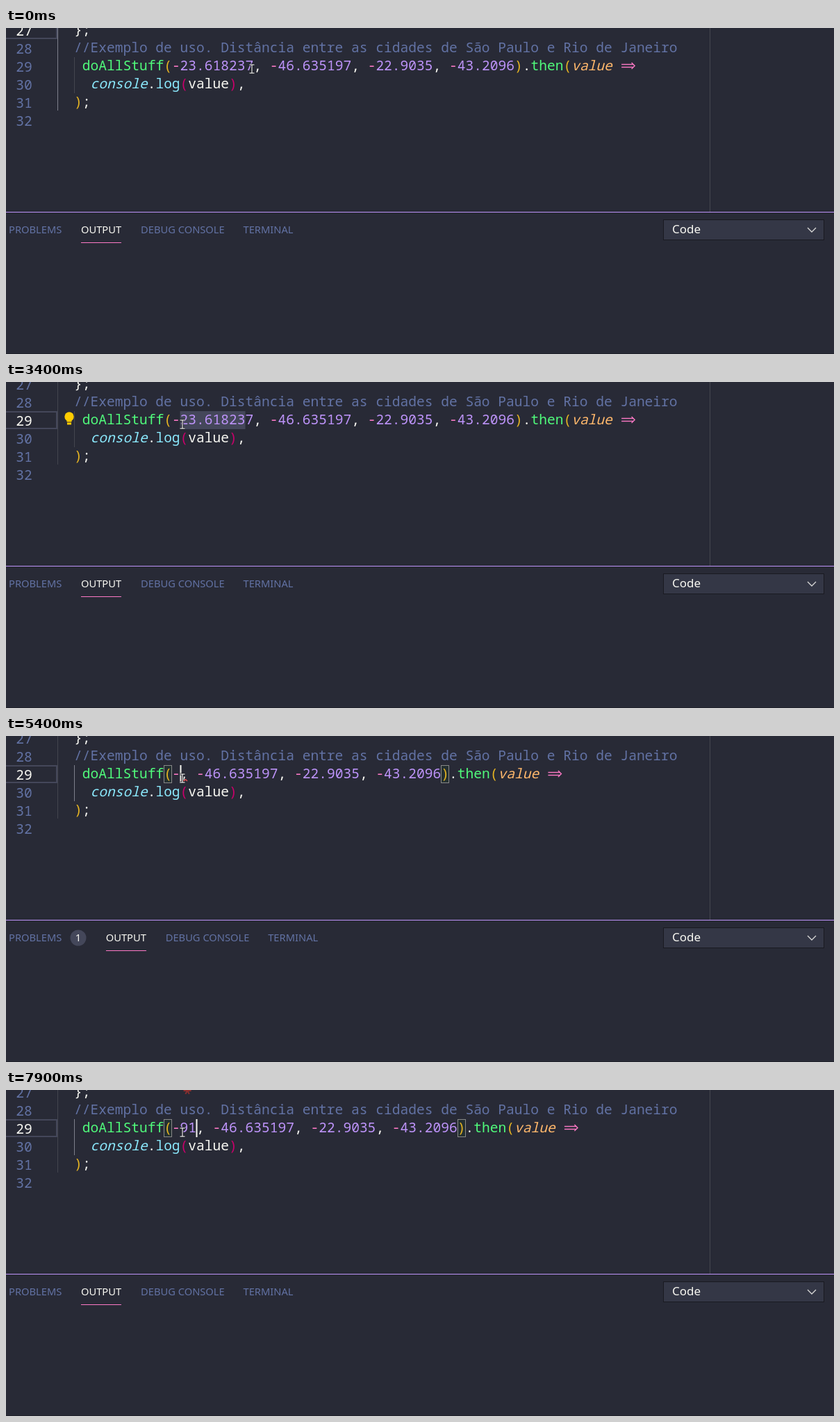
An HTML page with a canvas that plays this animation: 1192x470 px, repeating every 8 s.

```html
<!DOCTYPE html>
<html lang="pt">
<head>
<meta charset="utf-8">
<style>
  html, body { margin: 0; width: 100%; height: 100%; overflow: hidden; background: #282a36; }
  canvas { display: block; }
</style>
</head>
<body>
<canvas id="stage" width="1192" height="470"></canvas>
<script>
const ctx = document.getElementById('stage').getContext('2d');
const LOOP = 8000, STEP = 100;
const LEFT = 98, CHAR = 11.74, ROW = 26.1;
const CODE_FONT = '19.57px "Noto Sans Mono", monospace';
const C = {
  bg: '#282a36', text: '#f8f8f2', comment: '#6272a4', green: '#50fa7b', cyan: '#8be9fd',
  pink: '#ff79c6', purple: '#bd93f9', orange: '#ffb86c', gold: '#e6b422', magenta: '#c9006b',
  select: '#44475a', match: '#3f414d', guide: '#44464f', guideOn: '#7d7f8c'
};

// time, pointer x, pointer y, caret column
const POINTER = [
  [0, 354, 59, 21], [200, 357, 58, 21], [300, 360, 57, 21], [700, 356, 57, 21], [800, 352, 57, 21],
  [1100, 346, 57, 21], [1200, 338, 57, 21], [1300, 327, 57, 20], [1400, 320, 57, 19],
  [1500, 312, 57, 18], [1600, 305, 57, 18], [1700, 297, 57, 17], [1800, 287, 57, 16],
  [1900, 275, 57, 15], [2000, 267, 57, 15], [2300, 266, 57, 15], [2400, 263, 58, 14],
  [2700, 259, 59, 14], [3000, 254, 61, 13]
];
const CLICK = 1100, CUT = 3900, DELETE = 4400, TYPE_9 = 7300, TYPE_1 = 7500;
const KEYS = [CUT, DELETE, TYPE_9, TYPE_1];
const BLINKS = [CLICK, 2700, 3000, 3400, 3700, 4900, 5400, 5900, 6400, 6900, TYPE_9];
const ANCHOR = 21, FLAME_LIFE = 500;

const colX = col => LEFT + col * CHAR;
const rowY = line => Math.round(35 + (line - 28) * ROW);
const within = (t, from, to) => t >= from && t < to;

function rect(x, y, w, h, color) {
  ctx.fillStyle = color;
  ctx.fillRect(x, y, w, h);
}

function text(str, x, y, color, font) {
  ctx.font = font;
  ctx.fillStyle = color;
  ctx.fillText(str, x, y);
}

function path(points, color, width) {
  ctx.beginPath();
  points.forEach(([x, y]) => ctx.lineTo(x, y));
  ctx.strokeStyle = color;
  ctx.lineWidth = width;
  ctx.stroke();
}

function codeLine(line, col, tokens) {
  for (const [str, color, italic] of tokens) {
    if (str === '=>') arrow(colX(col), rowY(line) - 6.5);
    else text(str, colX(col), rowY(line), color, (italic ? 'italic ' : '') + CODE_FONT);
    col += str.length;
  }
}

function arrow(x, y) {
  path([[x + 1.5, y - 2], [x + 18.5, y - 2]], C.pink, 1.4);
  path([[x + 1.5, y + 2], [x + 18.5, y + 2]], C.pink, 1.4);
  path([[x + 16, y - 4.5], [x + 20.5, y], [x + 16, y + 4.5]], C.pink, 1.4);
}

function callTokens(args) {
  const numbers = args.match(/-|[\d.]+|, /g).map(s =>
    [s, s === '-' ? C.pink : s === ', ' ? C.text : C.purple]);
  return [
    ['doAllStuff', C.green], ['(', C.gold], ...numbers, [')', C.gold], ['.', C.text],
    ['then', C.green], ['(', C.gold], ['value', C.orange, true], [' ', C.text], ['=>', C.pink]
  ];
}

function selection(call, col) {
  const picked = call.slice(col - 1, ANCHOR - 1);
  if (!picked) return;
  for (let i = call.indexOf(picked); i >= 0; i = call.indexOf(picked, i + 1)) {
    const own = i === col - 1;
    rect(colX(i + 1), 42, picked.length * CHAR, 26, own ? C.select : C.match);
  }
}

function bracketBox(col) {
  rect(colX(col), 42, CHAR, 26, '#243031');
  ctx.strokeStyle = '#888888';
  ctx.lineWidth = 1;
  ctx.strokeRect(Math.round(colX(col)) + .5, 42.5, 11, 25);
}

function bulb() {
  ctx.fillStyle = '#ffcc00';
  ctx.beginPath();
  ctx.arc(91, 50, 6.7, 0, 7);
  ctx.fill();
  rect(87.5, 54, 7, 3.5, '#ffcc00');
  rect(88, 58.5, 6, 3, '#ffcc00');
}

function pointer(x, y) {
  for (const [color, width] of [['#15161c', 3], ['#f4f4f4', 1.2]]) {
    path([[x, y - 6], [x, y + 6]], color, width);
    for (const dy of [-6, 6]) path([[x - 3.5, y + dy], [x + 3.5, y + dy]], color, width);
  }
}

function flameLayer(x, bottom, half, color) {
  const belly = bottom - 17;
  ctx.fillStyle = color;
  ctx.beginPath();
  ctx.moveTo(x, bottom);
  ctx.bezierCurveTo(x - half, bottom - 3, x - half * 1.3, belly, x - half * .6, belly - 12);
  ctx.lineTo(x - half * .7, -8);
  ctx.lineTo(x + half * .8, -8);
  ctx.bezierCurveTo(x + half * .5, belly - 12, x + half * 1.5, belly, x + half * .7, bottom - 5);
  ctx.fill();
}

function flame(x, age) {
  if (age >= 400) {
    for (let i = 0; i < 6; i++)
      path([[x, 1], [x + 5.5 * Math.cos(i * 1.05), 1 + 5.5 * Math.sin(i * 1.05)]], '#8a2f2f', 2);
    return;
  }
  const bottom = age < 100 ? 42 : 46 - (age - 100) * .11;
  const half = 7.5 - age * .008;
  flameLayer(x, bottom, half, '#a8380f');
  flameLayer(x + .5, bottom - 3, half * .72, '#f47a16');
  flameLayer(x - .5, bottom - 7, half * .35, '#ffc44a');
}

function panel(problem) {
  const font = '14.7px "Noto Sans", sans-serif';
  const shift = problem ? 35.7 : 0;
  rect(0, 265, 1192, 1, C.purple);
  text('PROBLEMS', 4, 296, C.comment, font);
  text('OUTPUT', 108 + shift, 296, C.text, font);
  text('DEBUG CONSOLE', 194 + shift, 296, C.comment, font);
  text('TERMINAL', 341.5 + shift, 296, C.comment, font);
  rect(108 + Math.round(shift), 309, 58, 1, C.pink);
  if (problem) {
    ctx.fillStyle = C.select;
    ctx.beginPath();
    ctx.arc(104, 291, 11.5, 0, 7);
    ctx.fill();
    text('1', 99.8, 296, C.text, font);
  }
  rect(946, 276, 232, 30, '#191a21');
  rect(947, 277, 230, 28, '#343746');
  text('Code', 959, 296, C.text, '17px "Noto Sans", sans-serif');
  path([[1154, 288], [1160, 294], [1166, 288]], '#d8d8d6', 1.3);
  rect(0, 469, 1192, 1, '#20222b');
}

function draw(t) {
  const [, px, py, dragCol] = POINTER.filter(k => k[0] <= t).pop();
  const edited = t >= CUT, clicked = t >= CLICK;
  const typed = t >= TYPE_1 ? '91' : t >= TYPE_9 ? '9' : '';
  const first = !edited ? '23.618237' : t < DELETE ? '7' : typed;
  const args = `-${first}, -46.635197, -22.9035, -43.2096`;
  const call = `doAllStuff(${args}).then(value =>`;
  const caretCol = edited ? 13 + typed.length : dragCol;
  const activeLine = clicked ? 29 : 27;
  const problem = within(t, 4800, 7700);

  rect(0, 0, 1192, 470, C.bg);
  rect(1013, 0, 1, 265, C.guide);
  rect(74, 0, 1, 119, clicked ? C.guide : C.guideOn);
  rect(98, 42, 1, 52, edited ? C.guideOn : C.guide);

  ctx.strokeStyle = C.select;
  ctx.lineWidth = 2;
  ctx.strokeRect(-3, rowY(activeLine) - 18, 76, 24);
  for (let n = 27; n <= 32; n++)
    text(n, 14.3, rowY(n) + 2, n === activeLine ? C.text : C.comment, CODE_FONT);

  if (clicked && !edited) selection(call, dragCol);
  if (within(t, CLICK, 1400) || edited) {
    bracketBox(11);
    bracketBox(12 + args.length);
  }

  codeLine(27, 0, [['};', C.text]]);
  codeLine(28, 0, [['//Exemplo de uso. Distância entre as cidades de São Paulo e Rio de Janeiro', C.comment]]);
  codeLine(29, 1, callTokens(args));
  codeLine(30, 2, [['console', C.cyan, true], ['.', C.text], ['log', C.cyan],
    ['(', C.magenta], ['value', C.text], [')', C.magenta], [',', C.text]]);
  codeLine(31, 0, [[')', C.gold], [';', C.text]]);

  if (problem)
    path([0, 1, 2, 3, 4].map(i => [251 + i * 2.5, 65 - i % 2 * 2.5]), '#ff5555', 1.2);
  if (within(t, 2400, CUT)) bulb();
  if (BLINKS.filter(b => b <= t).length % 2)
    rect(Math.round(colX(caretCol)) - .5, 42, 2, 26, C.text);

  const key = KEYS.filter(k => k <= t).pop();
  if (t - key < FLAME_LIFE) flame(colX(caretCol) - 13, t - key);
  pointer(px, py);
  panel(problem);
}

function tick() {
  draw(Math.floor(performance.now() % LOOP / STEP) * STEP);
  requestAnimationFrame(tick);
}
tick();
</script>
</body>
</html>
```
